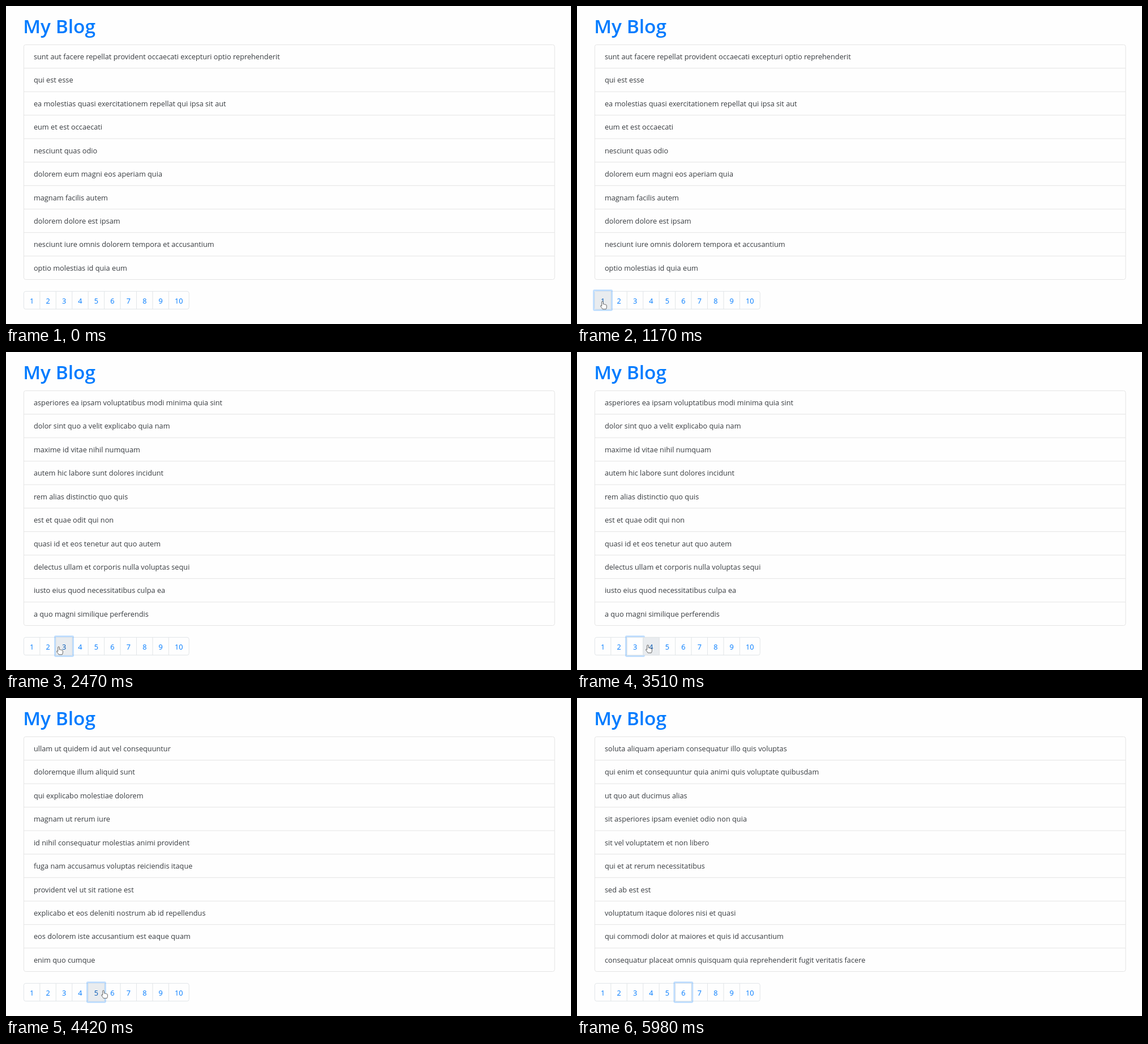
Recreate the animation shown at these times as an HTML page. Size 998x561 px, loop 6.5 s.

```html
<!DOCTYPE html>
<html lang="la">
<head>
<meta charset="utf-8">
<title>My Blog</title>
<style>
  html, body { margin: 0; width: 100%; height: 100%; overflow: hidden; background: #fefefe; }
  svg { display: block; width: 998px; height: 561px; font: 12.76px "Open Sans", sans-serif; }
  .title { font-size: 33.4px; font-weight: 600; fill: #007bff; }
  .list { fill: none; stroke: #e1e1e1; stroke-width: .9; }
  .pager { fill: none; stroke: #dee2e6; stroke-width: .9; }
  .post { fill: #383c40; }
  .number { fill: #007bff; text-anchor: middle; }
  .number.hover { fill: #0056b3; }
  .button { fill: #fff; stroke: #dee2e6; stroke-width: .9; }
  .button.hover { fill: #e9ecef; }
  .ring { fill: none; stroke: #007bff; stroke-opacity: .25; stroke-width: 2.8; }
  .cursor { fill: #fff; stroke: #444; stroke-width: .9; stroke-linejoin: round; }
</style>
</head>
<body>
<svg viewBox="0 0 998 561">
  <text class="title" x="30.3" y="47.6">My Blog</text>
  <g id="list" class="list"></g>
  <g id="pager" class="pager"></g>
  <g id="posts" class="post"></g>
  <g id="buttons"></g>
  <path id="cursor" class="cursor"/>
</svg>
<script>
const LOOP = 6500, TICK = 130;
const LIST = { left: 31.4, right: 969, top: 68.3, bottom: 482.5 };
const PAGER = { left: 31.4, right: 323.3, top: 503.4, bottom: 534.8, step: 28.45 };
const ROW = (LIST.bottom - LIST.top) / 10;
const HAND = 'M-1.4 9V1Q-1.4 0 0 0T1.4 1V5.5Q3 4.8 4 6Q5.5 5.4 6.2 6.7Q7.7 6.2 8 8V11Q8 13 6.7 15H.3Q-1.2 12.5-3.5 9.8Q-4 8-2.6 8Z';
const ARROW = 'M0 0V13L3 10L5 15L7 14L5 9H9Z';

const pages = [
`sunt aut facere repellat provident occaecati excepturi optio reprehenderit
qui est esse
ea molestias quasi exercitationem repellat qui ipsa sit aut
eum et est occaecati
nesciunt quas odio
dolorem eum magni eos aperiam quia
magnam facilis autem
dolorem dolore est ipsam
nesciunt iure omnis dolorem tempora et accusantium
optio molestias id quia eum`,
`et ea vero quia laudantium autem
in quibusdam tempore odit est dolorem
dolorum ut in voluptas mollitia et saepe quo animi
voluptatem eligendi optio
eveniet quod temporibus
sint suscipit perspiciatis velit dolorum rerum ipsa laboriosam odio
fugit voluptas sed molestias voluptatem provident
voluptate et itaque vero tempora molestiae
adipisci placeat illum aut reiciendis qui
doloribus ad provident suscipit at`,
`asperiores ea ipsam voluptatibus modi minima quia sint
dolor sint quo a velit explicabo quia nam
maxime id vitae nihil numquam
autem hic labore sunt dolores incidunt
rem alias distinctio quo quis
est et quae odit qui non
quasi id et eos tenetur aut quo autem
delectus ullam et corporis nulla voluptas sequi
iusto eius quod necessitatibus culpa ea
a quo magni similique perferendis`,
`ullam ut quidem id aut vel consequuntur
doloremque illum aliquid sunt
qui explicabo molestiae dolorem
magnam ut rerum iure
id nihil consequatur molestias animi provident
fuga nam accusamus voluptas reiciendis itaque
provident vel ut sit ratione est
explicabo et eos deleniti nostrum ab id repellendus
eos dolorem iste accusantium est eaque quam
enim quo cumque`,
`non est facere
commodi ullam sint et excepturi error explicabo praesentium voluptas
eligendi iste nostrum consequuntur adipisci praesentium sit beatae perferendis
optio dolor molestias sit
ut numquam possimus omnis eius suscipit laudantium iure
aut quo modi neque nostrum ducimus
quibusdam cumque rem aut deserunt
ut voluptatem illum ea doloribus itaque eos
laborum non sunt aut ut assumenda perspiciatis voluptas
repellendus qui recusandae incidunt voluptates tenetur qui omnis exercitationem`,
`soluta aliquam aperiam consequatur illo quis voluptas
qui enim et consequuntur quia animi quis voluptate quibusdam
ut quo aut ducimus alias
sit asperiores ipsam eveniet odio non quia
sit vel voluptatem et non libero
qui et at rerum necessitatibus
sed ab est est
voluptatum itaque dolores nisi et quasi
qui commodi dolor at maiores et quis id accusantium
consequatur placeat omnis quisquam quia reprehenderit fugit veritatis facere`
].map(page => page.split('\n'));

// Buttons 1 to 6 are clicked in turn.
const clicks = [1040, 1820, 2470, 3640, 4420, 5070];

const ENTER = { time: 260, x: 150, y: 555 };
const EXIT_TIME = 5980;
const moves = [
  { leave: 260, arrive: 910, x: 45, y: 521 },
  { leave: 1300, arrive: 1820, x: 75, y: 521 },
  { leave: 2080, arrive: 2470, x: 93, y: 520 },
  { leave: 2730, arrive: 3510, x: 125, y: 517 },
  { leave: 4030, arrive: 4420, x: 172, y: 516 },
  { leave: 4680, arrive: 5070, x: 195.5, y: 516 },
  { leave: 5460, arrive: 5720, x: 534, y: 547 }
];

const byId = id => document.getElementById(id);
const range = count => [...Array(count).keys()];
const smooth = p => p * p * (3 - 2 * p);

const buttons = range(10).map(i => {
  const x = PAGER.left + PAGER.step * i;
  return { number: i + 1, x, width: i === 9 ? PAGER.right - x : PAGER.step };
});

const box = ({ left, right, top, bottom }) =>
  `<rect x="${left}" y="${top}" width="${right - left}" height="${bottom - top}" rx="3.4"/>`;

byId('list').innerHTML = box(LIST) +
  range(9).map(i => `<path d="M${LIST.left} ${LIST.top + ROW * (i + 1)}H${LIST.right}"/>`).join('');
byId('pager').innerHTML = box(PAGER) +
  buttons.slice(1).map(({ x }) => `<path d="M${x} ${PAGER.top}V${PAGER.bottom}"/>`).join('');

function cursorAt(time) {
  if (time < ENTER.time || time >= EXIT_TIME) return null;
  let { x, y } = ENTER;
  for (const move of moves) {
    const progress = (time - move.leave) / (move.arrive - move.leave);
    const eased = smooth(Math.min(1, Math.max(0, progress)));
    x += (move.x - x) * eased;
    y += (move.y - y) * eased;
  }
  return { x, y };
}

const focusAt = time => clicks.filter(click => click <= time).length;

// Pages after the third arrive one tick after their click.
function pageAt(time) {
  const loaded = clicks.filter((click, i) => click + (i > 2 ? TICK : 0) <= time).length;
  return pages[Math.max(0, loaded - 1)];
}

function buttonBelow({ x, y }) {
  const inside = y >= PAGER.top && y <= PAGER.bottom;
  return inside ? buttons.find(b => x >= b.x && x < b.x + b.width) : undefined;
}

function highlight({ x, width }, hovered, focused) {
  const rect = (name, grow) => `<rect class="${name}" x="${x - grow}" y="${PAGER.top - grow}" ` +
    `width="${width + 2 * grow}" height="${PAGER.bottom - PAGER.top + 2 * grow}" rx="1"/>`;
  return rect(hovered ? 'button hover' : 'button', 0) + (focused ? rect('ring', 1.8) : '');
}

function draw(time) {
  const tip = cursorAt(time);
  const hovered = tip && buttonBelow(tip);
  const focused = buttons[focusAt(time) - 1];

  byId('posts').innerHTML = pageAt(time)
    .map((text, i) => `<text x="48.9" y="${94 + ROW * i}">${text}</text>`).join('');

  byId('buttons').innerHTML =
    buttons.filter(b => b === hovered || b === focused)
      .map(b => highlight(b, b === hovered, b === focused)).join('') +
    buttons.map(b => `<text class="number ${b === hovered ? 'hover' : ''}" ` +
      `x="${b.x + b.width / 2}" y="524.6">${b.number}</text>`).join('');

  const cursor = byId('cursor');
  cursor.style.display = tip ? '' : 'none';
  if (tip) {
    cursor.setAttribute('d', hovered ? HAND : ARROW);
    cursor.setAttribute('transform', `translate(${tip.x} ${tip.y}) scale(.92)`);
  }
}

const origin = performance.now();
let shown = -1;

function tick() {
  const time = (performance.now() - origin) % LOOP;
  const step = Math.floor(time / TICK);
  if (step !== shown) draw((shown = step) * TICK);
  requestAnimationFrame(tick);
}
tick();
</script>
</body>
</html>
```
